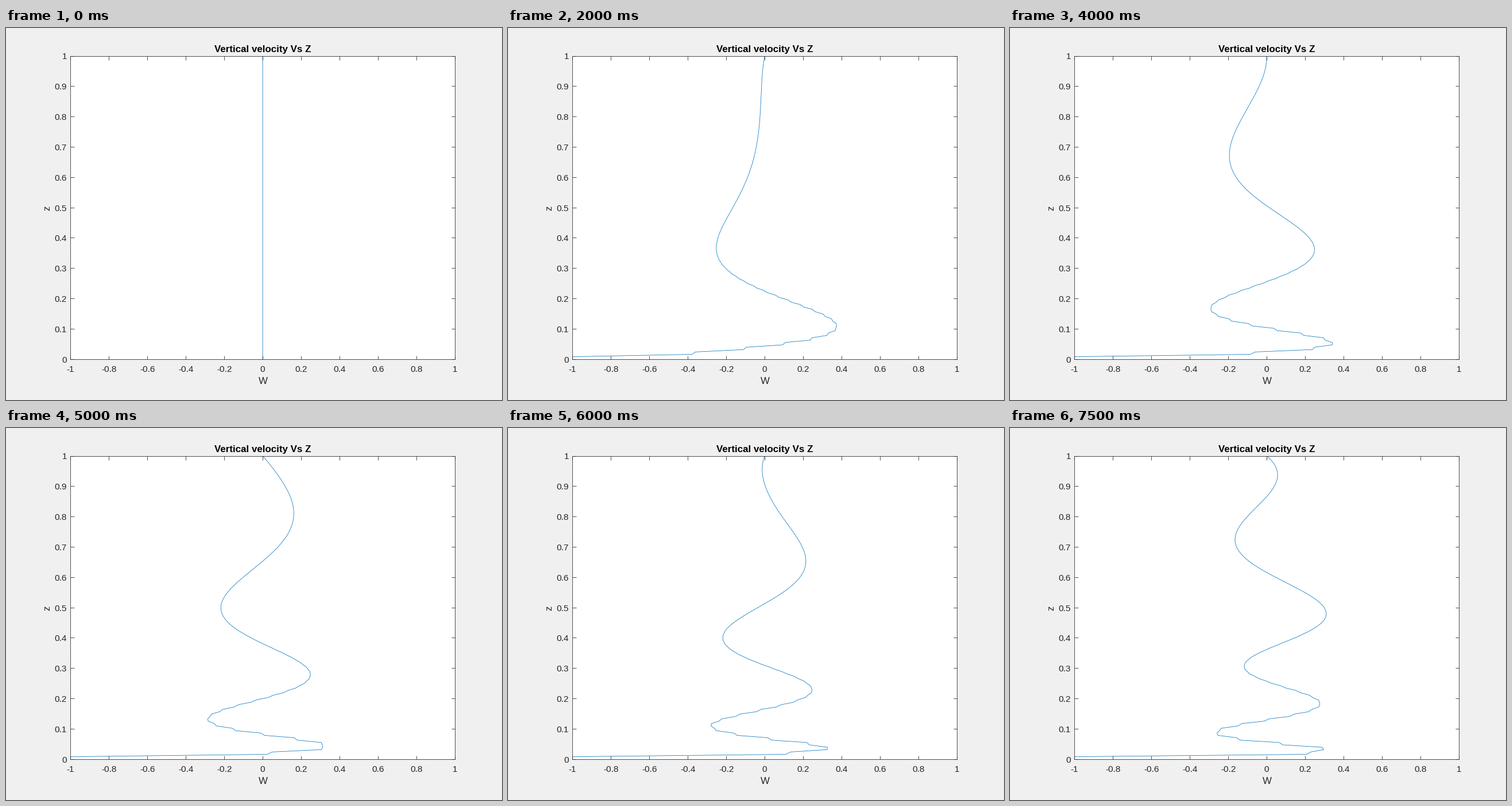
Write a matplotlib script that moves like this. It is 864x648 px and loops after 8 s.

```python
import numpy as np
import matplotlib.pyplot as plt
from matplotlib.animation import FuncAnimation

W, H = 864, 648
STEPS, INTERVAL = 16, 500
INK = "#262626"

plt.rcParams["font.family"] = "Liberation Sans"
plt.rcParams["axes.axisbelow"] = False

fig = plt.figure(figsize=(W / 72, H / 72), dpi=72, facecolor="#f0f0f0")
ax = fig.add_axes([0.13, 0.11, 0.775, 0.815])
ax.set(xlim=(-1, 1), ylim=(0, 1),
       xticks=np.linspace(-1, 1, 11), yticks=np.linspace(0, 1, 11))
ax.tick_params(direction="in", length=6.5, width=0.8, color=INK,
               top=True, right=True, labelbottom=False, labelleft=False)
for spine in ax.spines.values():
    spine.set(linewidth=0.8, color=INK)


def label(x, y, text, size=15.4, **style):
    style = {"ha": "center", "va": "baseline", "color": INK, **style}
    fig.text(x / W, 1 - y / H, text, fontsize=size, **style)


for v in np.linspace(0, 1, 11):
    label(112.3 + 669.6 * v, 598.7, f"{2 * v - 1:.1g}".replace("-0.0", "0"))
    label(106, 582.6 - 528.1 * v, f"{v:.1g}", ha="right")
label(447.5, 42.2, "Vertical velocity Vs Z", 16.9, weight="bold", color="black")
label(447.5, 620, "W", 16.9)
label(71.8, 313.5, "z", 16.9, rotation=90, va="center")

N = 128
nodes = np.arange(N + 1)
z = nodes / N
# odd nodes lag behind the even ones near the floor
lagged = z - 0.9 * np.exp(-(z / 0.22) ** 2) / N * (nodes % 2)
lagged = np.maximum(lagged, 1e-6)


def bessel0(x):
    angles = np.pi * (np.arange(64) + 0.5) / 64
    return np.cos(np.outer(x, np.sin(angles))).mean(axis=1)


def wave(h, t):
    """Dispersive wave sent up from a floor that moves at -1."""
    age = np.maximum(t - 0.25 - 1.3 * h - 0.85 * h ** 2, 0)
    front = 1 - np.exp(-(age / h / 5.5) ** 1.5)
    floor_loss = 1 - 0.3 * np.exp(-h / 0.07)
    return -bessel0(2 * np.sqrt(10 * h * age)) * front * floor_loss


def echo(h, t):
    """Broad pulse that sinks from the lid late in the run."""
    centre = 0.92 - 0.17 * (t - 12)
    return 0.13 * np.exp(-((h - centre) / 0.2) ** 2)


def profile(t):
    if t == 0:
        return np.zeros(N + 1)
    w = (wave(lagged, t) + echo(lagged, t)) * (1 - z ** 12)
    w[:2] = -1
    return w


line, = ax.plot([], [], color="#0072BD", lw=0.75, snap=False)


def update(step):
    line.set_data(profile(step), z)
    return line,


anim = FuncAnimation(fig, update, frames=STEPS, interval=INTERVAL,
                     repeat=True, repeat_delay=0)
plt.show()
```
